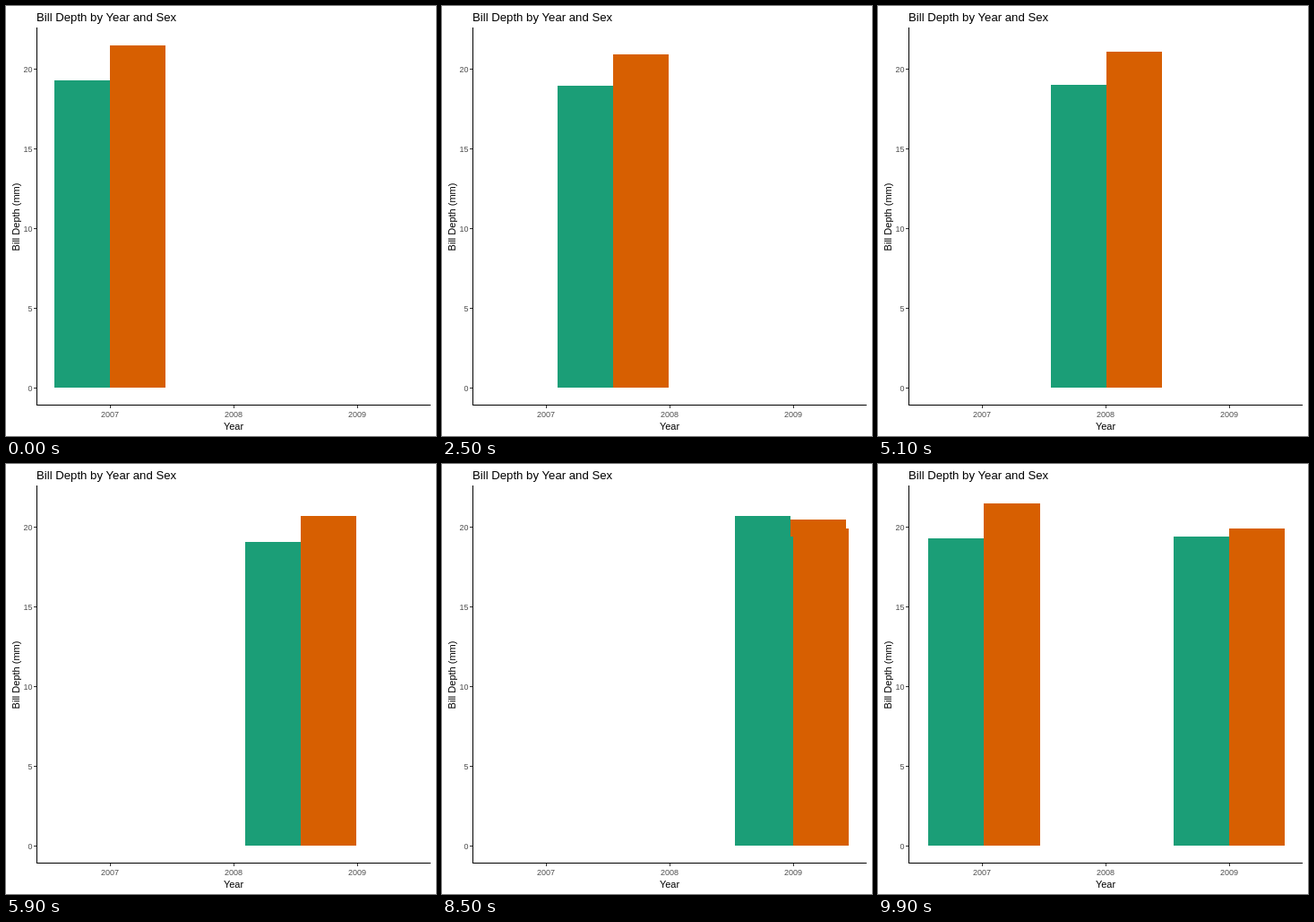
These frames come from a looping animation (480 by 480 pixels, 10 s). An HTML page:

```html
<!DOCTYPE html>
<html lang="en">
<head>
<meta charset="utf-8">
<title>Bill Depth by Year and Sex</title>
<style>
  html, body { margin: 0; width: 100%; height: 100%; overflow: hidden; background: #fff; }
  svg { display: block; width: 480px; height: 480px; font-family: "Liberation Sans", Arial, sans-serif; }
  rect, .axis, .tick { shape-rendering: crispEdges; }
  .axis { stroke: #000; fill: none; }
  .tick { stroke: #333; }
  .title { font-size: 13.2px; }
  .name { font-size: 11px; text-anchor: middle; }
  .label { font-size: 9px; fill: #4d4d4d; }
  .female { fill: #1b9e77; }
  .male { fill: #d75f01; }
</style>
</head>
<body>
<svg viewBox="0 0 480 480">
  <text class="title" x="34" y="17">Bill Depth by Year and Sex</text>
  <g id="bars"></g>
  <path class="axis" d="M34.5 24V445.5H474"/>
  <g id="ticks"></g>
  <text class="name" x="254" y="473">Year</text>
  <text class="name" transform="translate(15 235.5) rotate(-90)">Bill Depth (mm)</text>
</svg>
<script>
const NS = 'http://www.w3.org/2000/svg';
const LOOP = 10000, STEP = 100;
const BASE = 426, HALF = 62.1;
const centre = year => 115.8 + 138.1 * year;
const depthY = depth => Math.round(426.3 - 17.8 * depth);

// Rows overlap in each bar, so the tallest [from, to] row shows.
// The last move leaves the surplus rows of 2009 standing until it ends.
const moves = [
  { start: 1600, steps: 17, from: 0, to: 1,
    female: [[19.3, 18.62], [18.85, 19]], male: [[21.5, 20.4], [20.66, 21.1]] },
  { start: 5000, steps: 17, from: 1, to: 2,
    female: [[19, 18.5], [17.05, 20.7]], male: [[21.1, 20.33], [20.3, 20.5]] },
  { start: 8400, steps: 16, from: 2, to: 0,
    female: [[20.7, 18.3], [19.4, 19.3]], male: [[20.5, 19.5], [19.55, 21.5]],
    stay: { female: 19.4, male: 19.9 } }
];

function add(parent, tag, attrs, text = '') {
  const el = document.createElementNS(NS, tag);
  for (const key in attrs) el.setAttribute(key, attrs[key]);
  el.textContent = text;
  return document.getElementById(parent).appendChild(el);
}

function makePair() {
  const [female, male] = ['female', 'male'].map(sex => add('bars', 'rect', { class: sex }));
  return { female, male };
}

function setBar(rect, left, right, depth) {
  const x = Math.round(left), y = depthY(depth);
  rect.setAttribute('x', x);
  rect.setAttribute('y', y);
  rect.setAttribute('width', Math.round(right) - x);
  rect.setAttribute('height', BASE - y);
}

function setPair(pair, x, female, male) {
  setBar(pair.female, x - HALF, x, female);
  setBar(pair.male, x, x + HALF, male);
}

for (let i = 0; i < 5; i++) {
  const y = 426.5 - 89 * i;
  add('ticks', 'path', { class: 'tick', d: `M31 ${y}h3` });
  add('ticks', 'text', { class: 'label', x: 29.5, y: y + 3.5, 'text-anchor': 'end' }, 5 * i);
}
for (let i = 0; i < 3; i++) {
  const x = 116.5 + 138 * i;
  add('ticks', 'path', { class: 'tick', d: `M${x} 446v3` });
  add('ticks', 'text', { class: 'label', x: x - 0.5, y: 459, 'text-anchor': 'middle' }, 2007 + i);
}

const moving = makePair(), staying = makePair();
setPair(staying, centre(2), moves[2].stay.female, moves[2].stay.male);

function draw(time) {
  const t = Math.floor((time % LOOP) / STEP) * STEP;
  const move = moves.filter(m => m.start <= t).pop() || moves[0];
  const part = Math.min(1, Math.max(0, (t - move.start) / STEP / move.steps));
  const p = (1 - Math.cos(Math.PI * part)) / 2;
  const mix = (a, b) => a + (b - a) * p;
  const tallest = rows => Math.max(...rows.map(([a, b]) => mix(a, b)));

  setPair(moving, mix(centre(move.from), centre(move.to)), tallest(move.female), tallest(move.male));
  const shown = move.stay && part > 0 ? 'visible' : 'hidden';
  staying.female.setAttribute('visibility', shown);
  staying.male.setAttribute('visibility', shown);
}

function loop() {
  draw(performance.now());
  requestAnimationFrame(loop);
}
loop();
</script>
</body>
</html>
```
